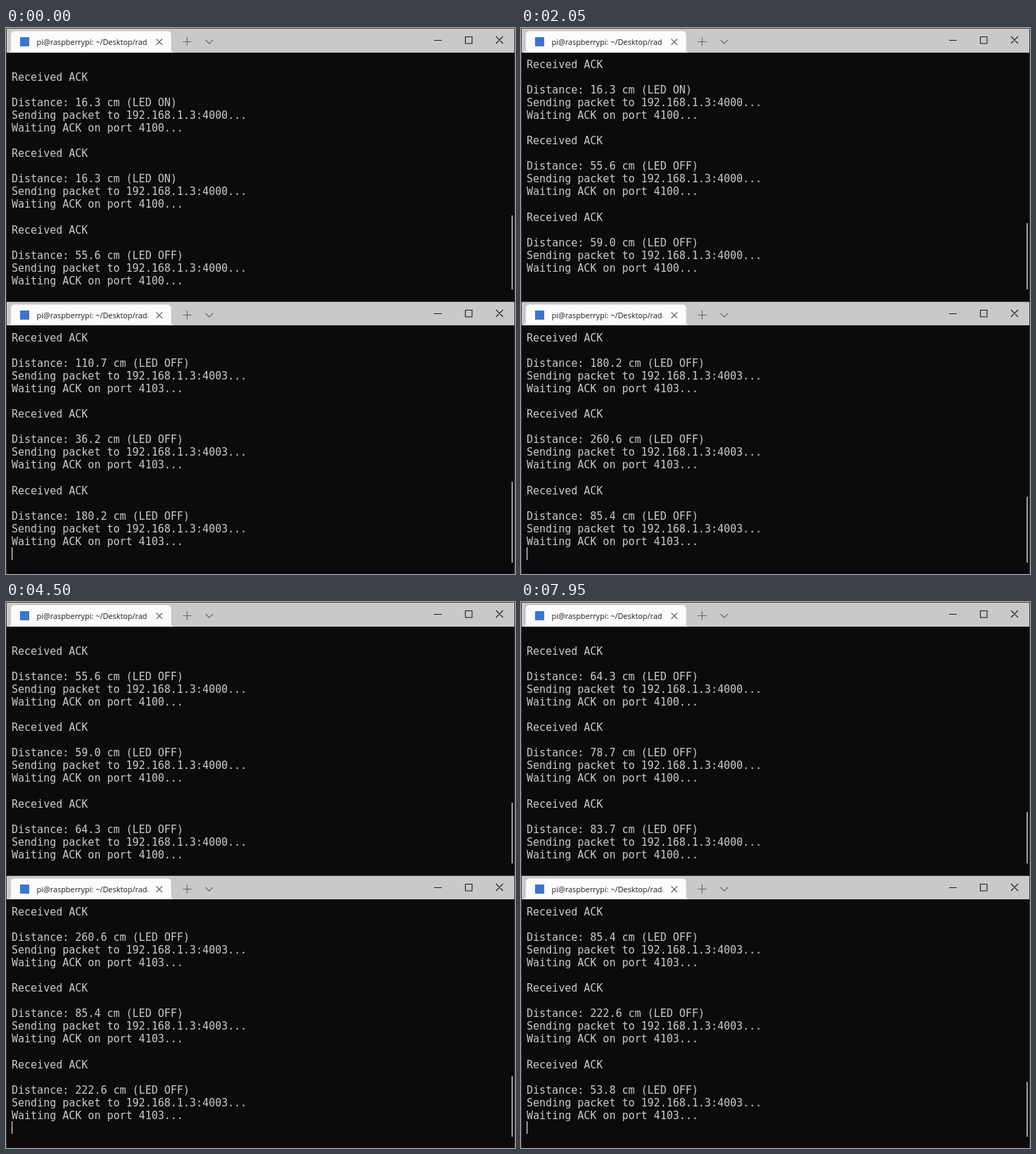
Recreate the animation shown at these times as an HTML page. Size 723 px wide and 775 px high, loop 8000 ms.

```html
<!DOCTYPE html>
<html lang="en">
<head>
<meta charset="utf-8">
<title>Distance sensors</title>
<style>
  html, body { margin: 0; width: 100%; height: 100%; overflow: hidden; background: #0c0a0c; }
  svg { display: block; width: 723px; height: 775px; }
  .term { font: 15px "DejaVu Sans Mono", monospace; fill: #cbcacb; white-space: pre; }
  .title { font: 10.9px "Open Sans", "Noto Sans", sans-serif; fill: #1c1c1c; }
  .line { fill: none; stroke: #1d1b1c; stroke-width: 1.1; }
  .soft { fill: none; stroke: #666465; stroke-width: 1.1; }
</style>
</head>
<body>
<svg id="stage" viewBox="0 0 723 775"></svg>
<script>
const LOOP = 8000, PITCH = 18.06, BLINK = 550;
const NS = "http://www.w3.org/2000/svg";
const stage = document.getElementById("stage");

// Each step: start time, blank rows on top, index of first reading, scrollbar top
const panes = [
  {
    y: 0, bar: 35, port: 0, end: 371, tab: "rad",
    readings: [16.3, 16.3, 55.6, 59, 64.3, 78.7, 83.7],
    steps: [[0, 1, 0, 266], [1450, 0, 1, 277], [3500, 1, 2, 285], [5500, 0, 3, 292], [7500, 1, 4, 298]]
  },
  {
    y: 388, bar: 34, port: 3, end: 759, tab: "rada", cursor: true,
    readings: [110.7, 36.2, 180.2, 260.6, 85.4, 222.6, 53.8],
    steps: [[0, 0, 0, 644], [500, 1, 1, 656], [2000, 0, 2, 665.5], [4000, 0, 3, 673], [6000, 0, 4, 681]]
  }
];

function add(parent, tag, attrs, text) {
  const el = document.createElementNS(NS, tag);
  for (const k in attrs) el.setAttribute(k, attrs[k]);
  if (text) el.textContent = text;
  parent.appendChild(el);
  return el;
}

function block(cm, port) {
  const led = cm < 20 ? "ON" : "OFF";
  return [
    "Received ACK", "",
    `Distance: ${cm.toFixed(1)} cm (LED ${led})`,
    `Sending packet to 192.168.1.3:400${port}...`,
    `Waiting ACK on port 410${port}...`, ""
  ];
}

function build(p, i) {
  const g = add(stage, "g", { transform: `translate(0 ${p.y})` });
  add(g, "rect", { x: 0, y: 0, width: 723, height: p.bar, fill: "#cac8c9" });
  add(g, "rect", { x: 0, y: 0, width: 723, height: 1, fill: "#4a4748" });
  add(g, "path", { d: `M2 ${p.bar}Q7 ${p.bar} 7 ${p.bar - 5}V10Q7 4.500 12.500 4.500H229Q234.500 4.500 234.500 10V${p.bar - 5}Q234.500 ${p.bar} 239.500 ${p.bar}Z`, fill: "#fdfcfd" });
  add(g, "rect", { x: 20, y: 13, width: 13, height: 13, fill: "#3a76cf" });

  const clip = add(g, "clipPath", { id: "tab" + i });
  add(clip, "rect", { x: 40, y: 4, width: 161.5, height: 30 });
  add(g, "text", { x: 43.5, y: 24, class: "title", "clip-path": `url(#tab${i})` }, "pi@raspberrypi: ~/Desktop/" + p.tab);

  add(g, "path", { class: "soft", d: "M213.500 15.500l8.500 8.500m0-8.500l-8.500 8.500M251 19.500h12.500M257.300 13v12.500M283.500 17l5.200 5.200l5.200-5.200" });
  add(g, "path", { class: "line", d: "M608 17.500h11M652.500 12.500h9.500v9.500h-9.500zM696 12l10 10m0-10l-10 10" });
  add(g, "rect", { x: 0, y: 0, width: 1, height: 387, fill: "#3d383a" });
  add(g, "rect", { x: 722, y: 0, width: 1, height: 387, fill: "#3d383a" });

  p.rows = Array.from({ length: 18 }, (_, n) =>
    add(stage, "text", { x: 8, y: (p.y + 56.8 + n * PITCH).toFixed(2), class: "term" }));
  p.thumb = add(stage, "rect", { x: 718, width: 2, fill: "#a09e9f" });
  if (p.cursor) p.caret = add(stage, "rect", { x: 8, y: 737, width: 1.2, height: 18, fill: "#dedede" });
}

function show(p, t) {
  const step = p.steps.filter(s => s[0] <= t).pop();
  const [, pad, first, top] = step;
  if (step !== p.now) {
    p.now = step;
    const lines = Array(pad).fill("");
    for (const cm of p.readings.slice(first, first + 3)) lines.push(...block(cm, p.port));
    p.rows.forEach((row, n) => row.textContent = lines[n] || "");
    p.thumb.setAttribute("y", top);
    p.thumb.setAttribute("height", p.end - top);
  }
  if (p.caret) {
    const lit = Math.floor((t - 350) / BLINK) % 2 !== 0;
    p.caret.setAttribute("visibility", lit && !pad ? "visible" : "hidden");
  }
}

add(stage, "rect", { width: 723, height: 775, fill: "#0c0a0c" });
panes.forEach(build);

const start = performance.now();
function tick() {
  const t = (performance.now() - start) % LOOP;
  panes.forEach(p => show(p, t));
  requestAnimationFrame(tick);
}
tick();
</script>
</body>
</html>
```
